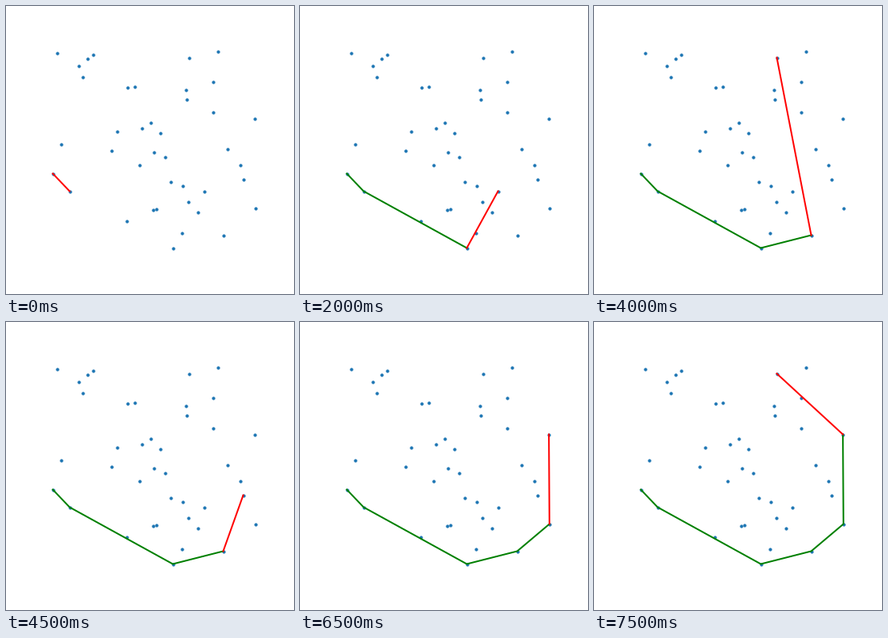
Write a matplotlib script that moves like this. It is 360 by 360 pixels and loops after 8000 ms.

```python
import matplotlib.pyplot as plt
from matplotlib.animation import FuncAnimation

SIZE, DPI, STEP_MS = 360, 72, 500

# Named points: hull corners A..G and the inner candidates tried on the way
A, B, C, D = (58, 209), (79, 231), (150, 268), (208, 302)
E, F, G = (271, 286), (311.3, 252), (310.6, 140)
MID, EAST, TOP, RIM = (184, 182), (247, 231), (228, 64), (296, 216)

OTHERS = [
    (63, 58), (108, 60), (101, 65), (90, 74), (95, 88), (151, 101),
    (160, 100), (264, 56), (258, 94), (224, 104), (225, 116), (258, 132),
    (180, 145), (169, 152), (138, 156), (192, 158), (131, 180), (68, 172),
    (198, 188), (166, 198), (276, 178), (292, 198), (205, 219), (220, 224),
    (227, 244), (239, 257), (183, 254), (187, 253), (219, 283),
]
POINTS = [A, B, C, D, E, F, G, MID, EAST, TOP, RIM] + OTHERS

# For every pivot, the successively better candidates; the last one is kept
TRIALS = [
    (A, [B]),
    (B, [EAST, C, D]),
    (D, [EAST, E]),
    (E, [MID, EAST, TOP, RIM, F]),
    (F, [TOP, RIM, G]),
    (G, [MID, TOP]),
]


def wrap_steps():
    hull, steps = [], []
    for pivot, candidates in TRIALS:
        hull = hull + [pivot]
        steps += [(hull, [pivot, c]) for c in candidates]
    return steps


def coords(points):
    xs, ys = zip(*points)
    return [x + 0.5 for x in xs], [y + 0.5 for y in ys]


fig = plt.figure(figsize=(SIZE / DPI, SIZE / DPI), dpi=DPI, facecolor="white")
ax = fig.add_axes([0, 0, 1, 1])
ax.set_xlim(0, SIZE)
ax.set_ylim(SIZE, 0)
ax.axis("off")

ax.scatter(*coords(POINTS), s=10, color="tab:blue")
hull_line, = ax.plot([], [], color="green", lw=2)
probe_line, = ax.plot([], [], color="red", lw=2)

STEPS = wrap_steps()


def draw(i):
    hull, probe = STEPS[i]
    hull_line.set_data(*(coords(hull) if len(hull) > 1 else ([], [])))
    probe_line.set_data(*coords(probe))
    return hull_line, probe_line


anim = FuncAnimation(fig, draw, frames=len(STEPS), interval=STEP_MS,
                     repeat=True, repeat_delay=0)
plt.show()
```
